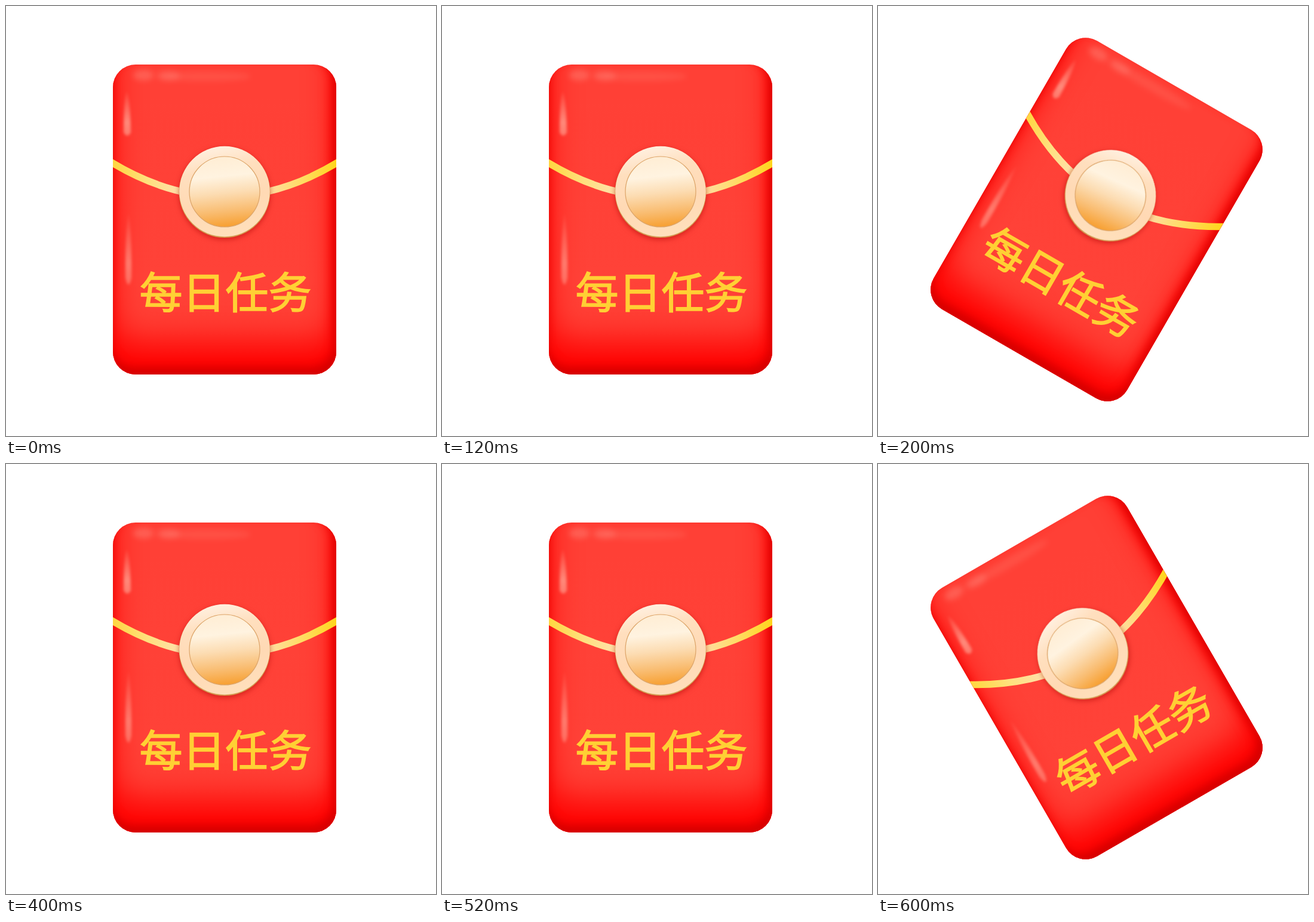
Write an HTML page that moves like this. It is 720x720 px and loops after 0.8 s.

```html
<!DOCTYPE html>
<html lang="zh-CN">
<head>
<meta charset="utf-8">
<style>
html, body { margin: 0; width: 100%; height: 100%; overflow: hidden; background: #fff; }
#card {
  position: absolute; left: 179px; top: 98px; width: 374px; height: 519px;
  border-radius: 38px; overflow: hidden;
  background: linear-gradient(#ff4036 10%, #ff4238 70%, #ff382e);
  box-shadow:
    inset -4px -12px 15px rgba(206, 0, 0, .85),
    inset -10px -14px 18px rgba(255, 0, 0, .75),
    inset 3px -12px 14px rgba(255, 0, 0, .4),
    inset 0 -54px 52px rgba(255, 0, 0, .92);
}
svg { display: block; }
text { font: 72px "Noto Sans CJK SC", "Noto Sans CJK", sans-serif; fill: #ffd034; stroke: #ffd034; stroke-width: 1.6; }
.medal { filter: drop-shadow(0 3px 4px rgba(170, 0, 0, .5)); }
</style>
</head>
<body>
<div id="card">
<svg width="374" height="519" viewBox="179 98 374 519">
  <defs>
    <linearGradient id="ribbon" gradientUnits="userSpaceOnUse" x1="179" x2="553" y1="0" y2="0">
      <stop offset="0" stop-color="#ffd640"/>
      <stop offset=".15" stop-color="#ffe07c"/>
      <stop offset=".28" stop-color="#ffe0a4"/>
      <stop offset=".72" stop-color="#ffdc98"/>
      <stop offset=".85" stop-color="#ffdc62"/>
      <stop offset="1" stop-color="#ffd51c"/>
    </linearGradient>
    <linearGradient id="rim" x1=".4" x2=".6" y1="0" y2="1">
      <stop offset="0" stop-color="#fff0e0"/>
      <stop offset=".25" stop-color="#ffdfbe"/>
      <stop offset=".6" stop-color="#ffd9b4"/>
      <stop offset="1" stop-color="#ffe0bc"/>
    </linearGradient>
    <linearGradient id="disc" x1=".45" x2=".55" y1="0" y2="1">
      <stop offset="0" stop-color="#ffedd4"/>
      <stop offset=".28" stop-color="#fff3e0"/>
      <stop offset=".52" stop-color="#fcdcb2"/>
      <stop offset=".78" stop-color="#f9bc70"/>
      <stop offset="1" stop-color="#f79f30"/>
    </linearGradient>
    <linearGradient id="gleam" x1="0" x2="0" y1="0" y2="1">
      <stop offset="0" stop-color="#ffa594" stop-opacity=".1"/>
      <stop offset=".7" stop-color="#ffa594" stop-opacity=".75"/>
      <stop offset="1" stop-color="#ffa594" stop-opacity=".6"/>
    </linearGradient>
    <filter id="soft" x="-100%" y="-100%" width="300%" height="300%"><feGaussianBlur stdDeviation="2"/></filter>
    <filter id="haze" x="-100%" y="-100%" width="300%" height="300%"><feGaussianBlur stdDeviation="5"/></filter>
  </defs>

  <g fill="#ff9184" filter="url(#haze)">
    <ellipse cx="230" cy="116" rx="17" ry="9" opacity=".38"/>
    <ellipse cx="272" cy="117" rx="19" ry="8" opacity=".34"/>
    <ellipse cx="335" cy="118" rx="75" ry="8" opacity=".2"/>
  </g>
  <g fill="url(#gleam)" filter="url(#soft)">
    <path d="M202 143 Q208 155 209 212 Q203 222 197 212 Q197 155 202 143Z"/>
    <path d="M205 346 Q211 390 210 455 Q205 478 200 455 Q199 390 205 346Z" opacity=".8"/>
  </g>

  <path d="M169 257.2 Q366 380.8 563 257.2" fill="none" stroke="url(#ribbon)" stroke-width="11.5"/>

  <g class="medal">
    <circle cx="366" cy="311.8" r="76.3" fill="#d39a50"/>
    <circle cx="366" cy="310.5" r="75.8" fill="url(#rim)"/>
    <circle cx="366" cy="311" r="59" fill="url(#disc)" stroke="#dca468" stroke-width="1.2"/>
  </g>

  <text x="223.5" y="505.5">每日任务</text>
</svg>
</div>
<script>
const card = document.getElementById("card");
const STEP = 200, TILT = 30;

// Hard poses: upright, right, upright, left
function draw() {
  const step = Math.floor(performance.now() / STEP) % 4;
  const angle = TILT * Math.round(Math.sin(step * Math.PI / 2));
  card.style.transform = `rotate(${angle}deg)`;
  requestAnimationFrame(draw);
}
draw();
</script>
</body>
</html>
```
